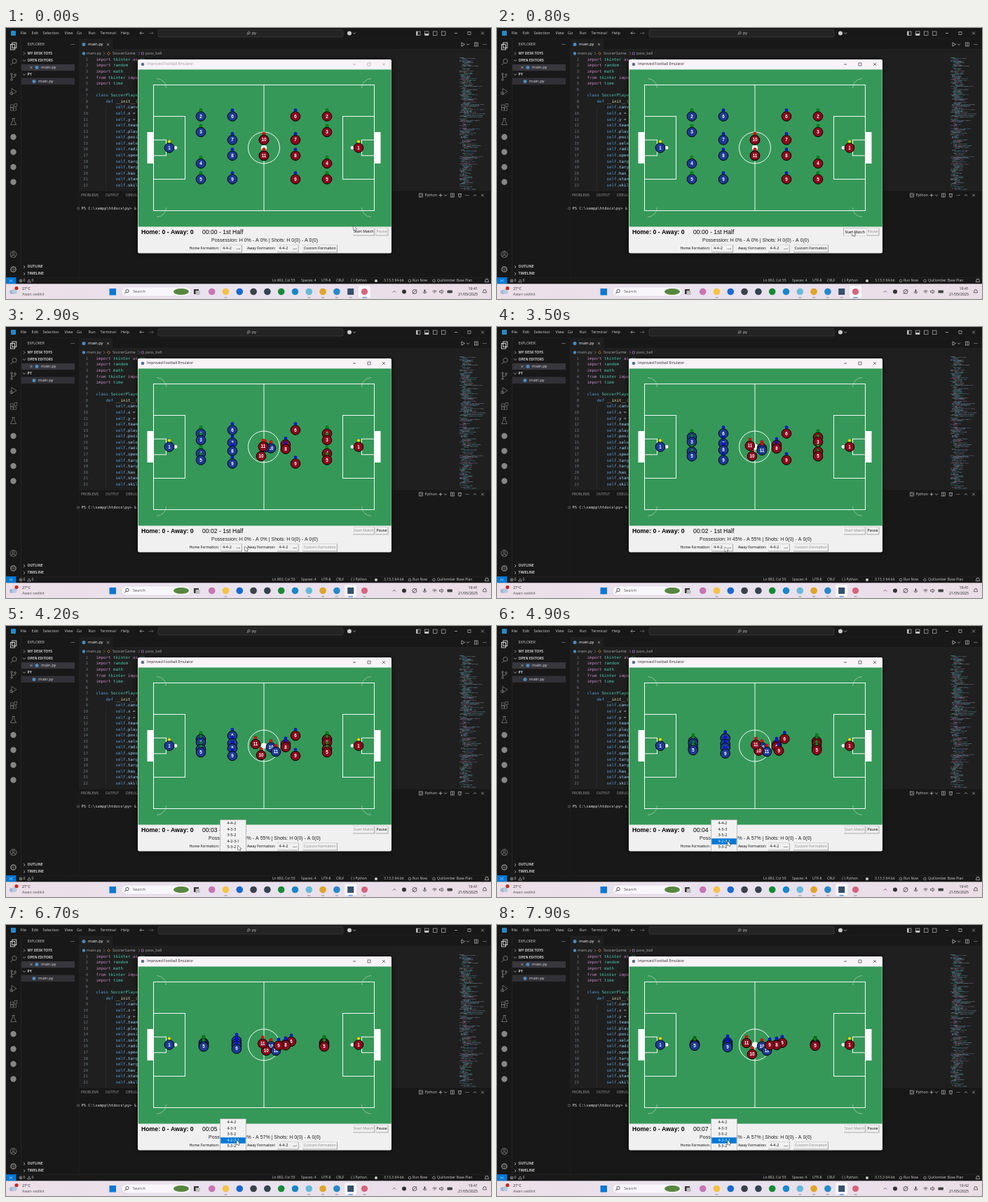
An HTML page with a canvas for the animation above (8000 ms loop, 692 by 388 pixels).

```html
<!DOCTYPE html>
<html lang="en">
<head>
<meta charset="utf-8">
<title>Match simulation</title>
<style>
html, body { margin: 0; width: 100%; height: 100%; overflow: hidden; background: #181818; }
canvas { display: block; width: 692px; height: 388px; }
</style>
</head>
<body>
<canvas id="stage" width="692" height="388"></canvas>
<script>
const W = 692, H = 388, LOOP = 8000;
const UI = '"Open Sans", "Noto Sans", sans-serif';
const MONO = '"DejaVu Sans Mono", monospace';
const ARIAL = '"Liberation Sans", Arial, sans-serif';
const screen = document.getElementById('stage').getContext('2d');
let g = screen;

function rect(x, y, w, h, color) {
  g.fillStyle = color;
  g.fillRect(x, y, w, h);
}
function frame(x, y, w, h, color, lw = 0.6) {
  g.strokeStyle = color;
  g.lineWidth = lw;
  g.strokeRect(x, y, w, h);
}
function round(x, y, w, h, r, fill, stroke) {
  g.beginPath();
  g.roundRect(x, y, w, h, r);
  if (fill) { g.fillStyle = fill; g.fill(); }
  if (stroke) { g.strokeStyle = stroke; g.lineWidth = 0.5; g.stroke(); }
}
function dot(x, y, r, color) {
  g.beginPath();
  g.arc(x, y, r, 0, 7);
  g.fillStyle = color;
  g.fill();
}
function ring(x, y, r, color, lw = 0.8, from = 0, to = Math.PI * 2) {
  g.beginPath();
  g.arc(x, y, r, from, to);
  g.strokeStyle = color;
  g.lineWidth = lw;
  g.stroke();
}
// Polyline from flat coordinates, relative to x, y
function path(x, y, pts, color, lw = 0.7) {
  g.beginPath();
  for (let i = 0; i < pts.length; i += 2) g.lineTo(x + pts[i], y + pts[i + 1]);
  g.strokeStyle = color;
  g.lineWidth = lw;
  g.stroke();
}
function text(s, x, y, size, color, font = UI, align = 'left', weight = '') {
  g.font = `${weight} ${size}px ${font}`;
  g.textAlign = align;
  g.textBaseline = 'middle';
  g.fillStyle = color;
  g.fillText(s, x, y);
}
function cross(x, y, r, c) {
  path(x, y, [-r, -r, r, r], c, 0.6);
  path(x, y, [-r, r, r, -r], c, 0.6);
}
function arrow(x, y, dir, c) {
  path(x, y, [-3 * dir, 0, 3 * dir, 0, dir, -2, 3 * dir, 0, dir, 2], c);
}
function chevron(x, y, down, c = '#ccc') {
  path(x, y, down ? [-2, -1, 0, 1, 2, -1] : [-1, -2, 1, 0, -1, 2], c);
}
function magnifier(x, y, r, c) {
  ring(x, y, r, c);
  path(x, y, [-r * 0.7, r * 0.7, -r * 1.7, r * 1.8], c, 0.9);
}
function bell(x, y, c) {
  ring(x, y, 2, c, 0.8, Math.PI, 0);
  path(x, y, [-2, 0, -2.7, 2.4, 2.7, 2.4, 2, 0], c);
}
function more(x, y) {
  for (let i = -2; i <= 2; i += 2) dot(x + i, y, 0.5, '#ccc');
}

function seeded(seed) {
  return () => (seed = (seed * 16807) % 2147483647) / 2147483647;
}

function drawTitleBar() {
  rect(0, 0, W, 15, '#181818');
  rect(0, 15, W, 0.6, '#2b2b2b');
  round(7, 4, 7, 7, 1, '#2489ca');
  const menu = { File: 20.5, Edit: 36.5, Selection: 52.5, View: 83.5, Go: 101, Run: 117.5, Terminal: 134.5, Help: 164 };
  for (const name in menu) text(name, menu[name], 7.7, 5.5, '#ccc');
  arrow(194, 7.5, -1, '#aaa');
  arrow(207, 7.5, 1, '#666');
  round(217, 2.5, 264, 10.5, 2, '#242424', '#4a4a4a');
  magnifier(346.5, 7, 1.6, '#aaa');
  text('py', 351, 7.5, 5.5, '#ccc');
  dot(490, 7.5, 3, '#ccc');
  chevron(497, 7.5, true);
  for (let i = 0; i < 4; i++) frame(585.5 + i * 12, 5, 5.5, 5.5, '#ccc');
  rect(585.5, 5, 2, 5.5, '#ccc');
  rect(597.5, 8, 5.5, 2.5, '#ccc');
  path(642, 7.5, [-2, 0, 2, 0], '#ccc');
  frame(659, 5.5, 4, 4, '#ccc');
  cross(680, 7.5, 2, '#ccc');
}

function drawActivityBar() {
  const c = '#868686';
  rect(0, 15.5, 21.5, 342, '#181818');
  rect(21.5, 15.5, 0.6, 342, '#2b2b2b');
  frame(6.5, 23.5, 6, 7.5, '#e0e0e0', 0.9);
  frame(8.8, 21, 6, 7.5, '#e0e0e0', 0.9);
  magnifier(12, 47.5, 3.1, c);
  path(8, 70, [0, 3, 0, -3, 0, 1, 5, 0, 5, -2], c);
  for (const [x, y] of [[8, 66], [8, 74], [13, 67]]) { dot(x, y, 1.5, '#181818'); ring(x, y, 1.3, c); }
  path(10, 91, [-2, -4.5, 5, 0, -2, 4.5, -2, -4.5], c);
  ring(7.5, 93.5, 1.8, c);
  for (const [x, y] of [[6.5, 110], [6.5, 114.2], [10.7, 114.2], [12, 108.5]]) frame(x, y, 3.8, 3.8, c);
  path(10.5, 134, [-2, -4.5, 2, -4.5, 1.2, -4.5, 1.2, -1, 4, 4.5, -4, 4.5, -1.2, -1, -1.2, -4.5], c);
  for (let i = 0; i < 4; i++) dot(10.5, 156 + i * 21.5, 4.2, c);
  ring(10.5, 324, 4.5, c);
  ring(10.5, 322.5, 1.6, c);
  ring(10.5, 328, 3, c, 0.8, Math.PI, 0);
  ring(10.5, 345.5, 3.6, c, 1.5);
  ring(10.5, 345.5, 1.3, c);
}

function drawSidebar() {
  rect(22, 15.5, 82, 342, '#181818');
  rect(104, 15.5, 0.6, 342, '#2b2b2b');
  text('EXPLORER', 30.5, 23.5, 5.1, '#ccc');
  more(95, 23.5);
  rect(22, 52, 76, 9.2, '#37373d');
  rect(22, 71.5, 76, 9.5, '#303036');
  const heads = [['MY DESK TOYS', 36.5], ['OPEN EDITORS', 46.5, 1], ['PY', 66.5, 1], ['OUTLINE', 342], ['TIMELINE', 352]];
  for (const [name, y, open] of heads) {
    chevron(26, y, open);
    text(name, 30.5, y, 5, '#ccc', UI, 'left', 'bold');
  }
  cross(36, 56.5, 1.6, '#ccc');
  for (const [x, y] of [[44, 56.5], [40, 76.5]]) {
    dot(x, y, 2.5, '#4b8bbe');
    text('main.py', x + 6, y, 5.8, '#ddd');
  }
}

const PURPLE = '#c586c0', TEAL = '#4ec9b0', BLUE = '#569cd6', LIGHT = '#9cdcfe';
const tint = { class: BLUE, def: BLUE, self: BLUE, __init__: '#dcdcaa' };
for (const word of ['import', 'from', 'as']) tint[word] = PURPLE;
for (const word of ['tkinter', 'random', 'math', 'time', 'tk', 'SoccerPlayer']) tint[word] = TEAL;
const fields = ['canvas', 'x = x', 'y = y', 'team', 'player', 'position', 'selected', 'radius', 'speed',
  'target_x', 'target_y', 'has_ball', 'stamina', 'skill'];
const code = ['import tkinter as tk', 'import random', 'import math', 'from tkinter import', 'import time', '',
  'class SoccerPlayer:', '    def __init__(self', ...fields.map(f => '        self.' + f)];

function drawCode() {
  code.forEach((line, i) => {
    const y = 45.4 + i * 8.57;
    text(i + 1, 117, y, 5.6, '#6e7681', MONO, 'right');
    for (const m of line.matchAll(/\w+|[^\w\s]/g)) {
      const color = tint[m[0]] || (/\w/.test(m[0]) ? LIGHT : '#ccc');
      text(m[0], 128.5 + m.index * 3.5, y, 5.82, color, MONO);
    }
  });
  rect(142.5, 113, 0.4, 120, '#3a3a3a');
}

function drawMinimap() {
  const rnd = seeded(77), colors = [BLUE, LIGHT, PURPLE, LIGHT, '#bbb', TEAL];
  g.globalAlpha = 0.5;
  for (let y = 41; y < 231; y += 1.2) {
    if (rnd() < 0.1) continue;
    let x = 647 + Math.floor(rnd() * 4) * 2;
    const end = x + 5 + rnd() * rnd() * 28;
    while (x < end) {
      const w = 1.5 + rnd() * 6;
      rect(x, y, w, 0.7, colors[Math.floor(rnd() * 6)]);
      x += w + 0.8;
    }
  }
  g.globalAlpha = 1;
}

function drawEditor() {
  rect(104.5, 15.5, W, 217, '#1f1f1f');
  rect(104.5, 15.5, W, 15.5, '#181818');
  rect(104.5, 30.5, W, 0.5, '#2b2b2b');
  rect(104.5, 16, 48, 15, '#1f1f1f');
  dot(111, 23.5, 2.5, '#4b8bbe');
  text('main.py', 117, 23.5, 5.8, '#fff');
  cross(145.5, 23.5, 1.6, '#ddd');
  path(652, 23.5, [-2, -2.7, 2.5, 0, -2, 2.7, -2, -2.7], '#ccc');
  chevron(659, 23.5, true);
  frame(668.5, 21, 5, 5, '#ccc');
  path(671, 21, [0, 0, 0, 5], '#ccc');
  more(683, 23.5);
  dot(111, 36.5, 2.2, '#4b8bbe');
  text('main.py', 115, 36.5, 5.6, '#a9a9a9');
  chevron(140, 36.5, false, '#888');
  path(146.5, 36.5, [-2, 0, 0, -2, 2, 0, 0, 2, -2, 0], '#ee9d28');
  text('SoccerGame', 152, 36.5, 5.6, '#a9a9a9');
  chevron(190, 36.5, false, '#888');
  frame(193.5, 35, 3, 3, '#b180d7');
  text('pass_ball', 199, 36.5, 5.5, '#a9a9a9');
  drawCode();
  drawMinimap();
}

function drawPanel() {
  const y = 239.5;
  rect(104.5, 232.5, W, 125, '#181818');
  rect(104.5, 232.5, W, 0.6, '#2b2b2b');
  text('PROBLEMS', 107, y, 4.9, '#9d9d9d');
  text('OUTPUT', 142, y, 4.9, '#9d9d9d');
  text('DEBUG CONSOLE', 171, y, 4.9, '#9d9d9d');
  frame(589.5, 237, 5, 5, '#ccc');
  chevron(592, y, false);
  text('Python', 597.5, y, 5.3, '#ccc');
  path(620, y, [-2.5, 0, 2.5, 0], '#ccc');
  path(620, y, [0, -2.5, 0, 2.5], '#ccc');
  chevron(627, y, true);
  frame(634.5, 237, 5, 5, '#ccc');
  path(637, 237, [0, 0, 0, 5], '#ccc');
  path(647.5, y, [-2.5, -2, 2.5, -2, 1.8, -2, 1.5, 2.5, -1.5, 2.5, -1.8, -2], '#ccc');
  more(658, y);
  path(669, y, [-2, 1, 0, -1, 2, 1], '#ccc');
  cross(680, y, 1.8, '#ccc');
  ring(103, 258.3, 1.6, '#888', 0.6);
  text('PS C:\\xampp\\htdocs\\py> & ', 107.5, 258.3, 5.45, '#ddd', MONO);
}

function drawStatusBar() {
  const y = 361.9, c = '#ccc';
  rect(0, 357, W, 10, '#181818');
  rect(0, 357, W, 0.5, '#2b2b2b');
  rect(0, 357, 14.5, 9.5, '#0078d4');
  path(7, y, [-2.2, -1.8, -0.4, 0, -2.2, 1.8], '#fff', 0.6);
  path(7, y, [2.2, -1.8, 0.4, 0, 2.2, 1.8], '#fff', 0.6);
  ring(21, y, 2, c, 0.6);
  cross(21, y, 0.8, c);
  text('0', 24.5, y, 5.2, c);
  path(33, y, [0, -2, 2.3, 2, -2.3, 2, 0, -2], c, 0.6);
  text('0', 36.5, y, 5.2, c);
  const items = { 'Ln 892, Col 55': 380, 'Spaces: 4': 421, 'UTF-8': 450, 'CRLF': 471, '{ } Python': 492,
    '3.13.3 64-bit': 539, 'Run Now': 580, 'Quillomber Base Plan': 615 };
  for (const s in items) text(s, items[s], y, 5, c);
  dot(528, y, 2, c);
  ring(576, y, 1.8, c, 0.6);
  ring(610.5, y, 1.8, c, 0.6);
  bell(686, y - 0.7, c);
}

const appX = i => 293.7 + i * 19.8;

function drawTaskbar() {
  const c = '#333';
  const shade = g.createLinearGradient(0, 0, W, 0);
  ['#ecdfe8', '#e8e2ee', '#ebdde6'].forEach((tone, i) => shade.addColorStop(i / 2, tone));
  rect(0, 366.3, W, 22, shade);
  dot(8, 378, 3, '#9db4d2');
  dot(12, 377.5, 3.6, '#b7c9e0');
  dot(15, 372.5, 2.6, '#c42b1c');
  text('27°C', 23, 373.5, 5.4, '#222');
  text('Awan sedikit', 23, 381.3, 5.4, '#555');
  rect(147.5, 373, 9.5, 9.5, '#0a78d4');
  round(165, 371, 99, 13, 6.5, '#f8f6fb', '#d5cdd8');
  magnifier(173, 376.5, 2.2, c);
  text('Search', 181, 377.5, 5.7, '#555');
  g.beginPath();
  g.ellipse(250, 377.5, 11, 4.5, 0, 0, 7);
  g.fillStyle = '#58863f';
  g.fill();
  rect(268, 374, 7, 7, c);
  rect(270.5, 376, 6, 6, '#bbb');
  const tones = ['#c875b5', '#f5c242', '#1769d1', '#3b4148', '#34424f', '#178a35', '#1687c8', '#67b9d8', '#e0a529', '#2489ca'];
  tones.forEach((tone, i) => dot(appX(i), 377.5, 4.8, tone));
  for (const i of [1, 7, 8, 9]) rect(appX(i) - 2, 385.5, 4, 0.9, '#888');
  path(554, 377.5, [-2.2, 1, 0, -1.2, 2.2, 1], c);
  dot(568, 377.5, 3, c);
  ring(583, 377.5, 3, c);
  path(583, 377.5, [-3, 3, 3, -3], c);
  path(597.5, 377.5, [0, -3, 0, 1], c, 1.6);
  ring(597.5, 377.5, 2.3, c, 0.7, 0, Math.PI);
  for (let r = 1; r < 5; r += 1.6) ring(611.5, 380, r, c, 0.7, -2.4, -0.75);
  path(621, 377.5, [-2.5, -1, -1, -1, 1, -2.7, 1, 2.7, -1, 1, -2.5, 1, -2.5, -1], c);
  ring(621, 377.5, 3, c, 0.6, -0.7, 0.7);
  round(629.5, 375.5, 7.5, 4, 1, '#444');
  text('21/05/2025', 673, 381.5, 5.3, '#222', UI, 'right');
  bell(683, 376.5, c);
}

// Field units to pixels
const fx = u => 188 + u * 0.45, fy = u => 59 + u * 0.45;
const box = (x, y, w, h) => frame(fx(x), fy(y), w * 0.45, h * 0.45, '#fff', 0.95);

function drawPitch() {
  rect(188.7, 59.5, 361, 225, '#359858');
  box(50, 50, 700, 400);
  path(fx(400), fy(50), [0, 0, 0, 180], '#fff', 0.95);
  ring(fx(400), fy(250), 22.5, '#fff', 0.95);
  for (const side of [0, 1]) {
    const at = (u, w = 0) => side ? 800 - u - w : u;
    box(at(50, 100), 150, 100, 200);
    box(at(50, 40), 225, 40, 50);
    rect(fx(at(30, 20)), fy(200), 9, 45, '#fff');
    dot(fx(at(120)), fy(250), 2.4, '#fff');
    for (const low of [0, 1]) {
      const quarter = low ? side : 3 - side;
      const from = quarter * Math.PI / 2 - (side && !low ? 0 : 0);
      ring(fx(at(60)), fy(low ? 440 : 60), 13.5, '#bfe0ca', 0.6, from, from + Math.PI / 2);
    }
  }
  dot(fx(400), fy(250), 4, '#fff');
}

function button(label, x, y, w, h, on = true, down = false) {
  rect(x, y, w, h, down ? '#777' : '#fff');
  rect(x + 0.6, y + 0.6, w - 0.6, h - 0.6, down ? '#fff' : '#777');
  rect(x + 0.6, y + 0.6, w - 1.2, h - 1.2, '#f0f0f0');
  const push = down ? 0.4 : 0;
  if (label) text(label, x + w / 2 + push, y + h / 2 + 0.2 + push, 5.3, on ? '#000' : '#8a8a8a', UI, 'center');
}

function drawWindow() {
  g.shadowColor = 'rgba(0,0,0,.6)';
  g.shadowBlur = 8;
  round(188, 45, 362, 277.5, 2.5, '#f0f0f0');
  g.shadowBlur = 0;
  round(188, 45, 362, 18, 2.5, '#f9f3f8');
  dot(195, 52, 2.3, '#55708f');
  drawPitch();
  text('Home: 0 - Away: 0', 193, 292.4, 8.7, '#000', ARIAL, 'left', 'bold');
  text('Home Formation:', 261.5, 316, 5.2, '#000');
  text('Away Formation:', 344, 316, 5.2, '#000');
  for (const x of [306, 386.5]) {
    button('', x, 310, 31, 11.3);
    text('4-4-2', x + 3, 316, 5.4, '#000');
    button('', x + 22, 314.5, 6, 2.4);
  }
}

// Motion
const lerp = (a, b, k) => a + (b - a) * k;
function ease(from, to, t) {
  const k = Math.min(1, Math.max(0, (t - from) / (to - from)));
  return k * k * (3 - 2 * k);
}

const MID = [368, 171.5], DASH = [384, 171];
const toward = (a, b, k) => [lerp(a[0], b[0], k), lerp(a[1], b[1], k)];

// Forwards meet in the centre, then take a spot; the away pair dashes out and back
function forward(n, away, t) {
  const first = n === 10;
  const spot = away ? (first ? [364, 185] : [356, 169]) : (first ? [378, 173.5] : [385, 180]);
  let p = toward([MID[0], MID[1] + (first ? -11.25 : 11.25)], MID, ease(900, 1800, t));
  p = toward(p, spot, first ? ease(1700, 2900, t) : ease(2600, 4200, t));
  if (!away) return p;
  const wave = Math.min(1, Math.max(0, (t - 4200) / 2900));
  return toward(p, DASH, Math.sin(Math.PI * wave) ** 2);
}

// Lines of four squeeze toward the middle and step up late
function place(n, away, t) {
  if (n === 1) return [away ? 503 : 233, MID[1]];
  if (n > 9) return forward(n, away, t);
  const back = n < 6, slot = (n - 2) % 4, inner = slot === 1 || slot === 2;
  const s = Math.max(0, t - 1000) / 1000;
  const squeeze = Math.exp(-(back ? 0.55 : 0.4) * s * s / (s + 0.4));
  let gap = (inner ? (back ? 22.5 : 11.25) : 45) * squeeze;
  let step = (back ? 4 : 6) * ease(4200, 5700, t);
  if (away && !back) {
    step = inner ? lerp(0, 14, ease(1800, 2900, t)) : (slot ? 24 : 6) * ease(4200, 5700, t);
    gap *= 1 - step / 30;
  }
  const x = (back ? 278 : 323) + step;
  return [away ? 736 - x : x, MID[1] + (slot < 2 ? -gap : gap)];
}

function drawPlayer(n, away, t) {
  const [x, y] = place(n, away, t);
  dot(x, y, 6.8, away ? '#8b0a1c' : '#1d3a94');
  ring(x, y, 6.8, '#000', 1);
  text(n, x, y + 0.4, 6.3, '#fff', ARIAL, 'center', 'bold');
  dot(x, y - 9, 2.2, n === 1 ? '#ffee00' : n < 6 ? '#0a8a1c' : n < 10 ? '#0a14f0' : '#f50a0a');
  ring(x, y - 9, 2.2, 'rgba(0,0,0,.55)', 0.4);
}

function drawMatch(t) {
  const run = t < 5700 ? t : Math.max(5700, t - 200);
  for (const away of [false, true])
    for (let n = 1; n <= 11; n++) drawPlayer(n, away, run);
}

function drawPopup(t) {
  rect(305.5, 277.5, 37, 45, '#f2f2f2');
  frame(305.5, 277.5, 37, 45, '#999');
  const pick = t >= 4500 ? 3 : -1;
  ['4-4-2', '4-3-3', '3-5-2', '4-2-3-1', '5-3-2'].forEach((s, i) => {
    const y = 283 + i * 8.5;
    if (i === pick) rect(306.3, y - 4.3, 35.4, 8.5, '#0078d7');
    text(s, 315.5, y, 5.4, i === pick ? '#fff' : '#000');
  });
}

function drawControls(t) {
  const on = t >= 1000, ink = t < 700 ? '#999' : '#222';
  text('Improved Football Emulator', 201, 52, 5.1, ink);
  path(497, 52, [-2, 0, 2, 0], ink);
  frame(516, 50, 4, 4, ink);
  cross(539, 52, 2, ink);
  const sec = Math.max(0, Math.floor((t - 900) / 1000));
  const home = t < 3500 ? 0 : t < 4900 ? 45 : 43;
  text(`00:0${sec} - 1st Half`, 280, 292.4, 8.6, '#000', ARIAL);
  text(`Possession: H ${home}% - A ${home ? 100 - home : 0}% | Shots: H 0(0) - A 0(0)`, 369, 303.9, 7, '#222', ARIAL, 'center');
  button('Start Match', 494.5, 286, 31.5, 11.3, !on, t >= 700 && !on);
  button('Pause', 526.8, 286, 18.5, 11.3, on);
  button('Custom Formation', 422.5, 310, 50.5, 11.3, !on);
  if (t >= 3700) drawPopup(t);
}

function drawTaskState(t) {
  const active = t < 1000 ? 11 : 10;
  round(appX(active) - 9, 368.5, 18, 18, 2, '#f8f5fb', '#dcd3de');
  rect(appX(10) - 4.5, 373, 9, 9, '#35506b');
  dot(appX(11), 377.5, 4.6, '#d8637c');
  for (const i of [10, 11]) {
    const w = i === active ? 6 : 4;
    rect(appX(i) - w / 2, 385.5, w, 0.9, i === active ? '#0067c0' : '#888');
  }
  text(t < 7000 ? '19:41' : '19:42', 673, 373.5, 5.3, '#222', UI, 'right');
}

// Pointer hops: start, end, x, y
const hops = [[100, 700, 507, 291], [1000, 1800, 342, 301], [1900, 2800, 341, 314],
  [3000, 3600, 324, 315], [3800, 4200, 331, 314], [4300, 4700, 329, 308]];

function drawCursor(t) {
  const [x, y] = hops.reduce((p, [from, to, ...end]) => toward(p, end, ease(from, to, t)), [496, 283]);
  path(x, y, [0, 0, 0, 6.6, 1.5, 5.2, 2.6, 7.6, 3.6, 7.1, 2.6, 4.8, 4.6, 4.8, 0, 0], '#000', 0.8);
  g.fillStyle = '#fff';
  g.fill();
}

const desk = document.createElement('canvas');
desk.width = W;
desk.height = H;
g = desk.getContext('2d');
for (const draw of [drawTitleBar, drawSidebar, drawActivityBar, drawEditor, drawPanel, drawStatusBar, drawTaskbar, drawWindow]) draw();
g = screen;

const start = performance.now();
function tick() {
  const t = Math.floor(((performance.now() - start) % LOOP) / 100) * 100;
  g.drawImage(desk, 0, 0);
  drawMatch(t);
  drawControls(t);
  drawTaskState(t);
  drawCursor(t);
  requestAnimationFrame(tick);
}
tick();
</script>
</body>
</html>
```
